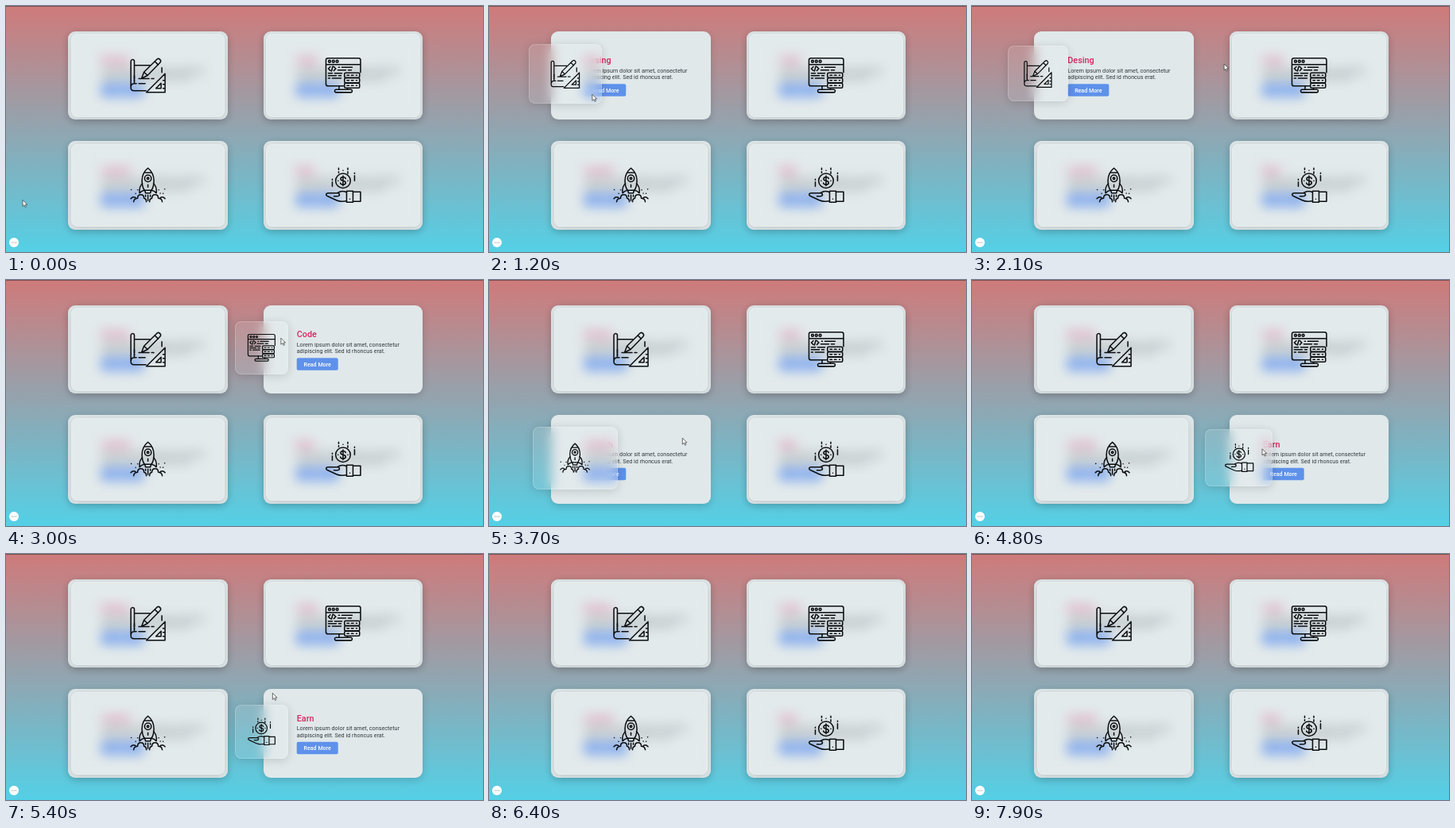
Write an HTML page that moves like this. It is 600x310 px and loops after 8000 ms.

```html
<!DOCTYPE html>
<html lang="en">
<head>
<meta charset="utf-8">
<title>Glass cards</title>
<style>
  html, body { margin: 0; width: 100%; height: 100%; overflow: hidden; }
  #stage { position: relative; width: 600px; height: 310px; overflow: hidden;
    background: linear-gradient(#cf7a7a, #54d0e6); }
  svg { position: absolute; left: 0; top: 0; width: 600px; height: 310px; }
  text { font-family: Roboto, sans-serif; }
  .card { position: absolute; width: 200.5px; height: 111.5px; border-radius: 9px;
    background: #e0e8ea; box-shadow: 0 3px 10px rgba(0, 0, 0, .16); }
  .panel { position: absolute; box-sizing: border-box; border-radius: 8px;
    background: rgba(255, 255, 255, .09); border: .6px solid rgba(255, 255, 255, .2);
    box-shadow: 0 2px 12px rgba(0, 0, 0, .15);
    -webkit-backdrop-filter: blur(7.5px); backdrop-filter: blur(7.5px); }
  .icon { fill: none; stroke: #0c0f10; stroke-width: 1.55; stroke-linecap: round; stroke-linejoin: round; }
</style>
</head>
<body>
<div id="stage"></div>
<script>
const LOOP = 8000, FADE = 500;
const stage = document.getElementById('stage');

// Icons are drawn in a 45 x 45 box
const icons = {
  design: `
    <path d="M1 38V5a2.2 2.2 0 0 1 4.4 0V33M5.4 10H25M40 13V19M1 38q0-5 4.4-5H8M11 33H19M1 38q0 4 4 4H20"/>
    <path d="M14.5 26.5L17.5 18.5L34 2.2q1.8-1.4 3.6.4t.4 3.7L22 22.8ZM17.5 18.5L22 22.8M31 5L35.4 9.4M11 26.7H24M27 26.7H30"/>
    <path d="M44 20.5V44H20.5ZM39 32.5V39H32.5ZM41.5 29H44M41.5 34H44M41.5 39H44"/>
    <path d="M5.4 23V27M5.4 29V30"/>`,
  code: `
    <path d="M23 36H3.5q-2.5 0-2.5-2.5V3.5Q1 1 3.5 1H42q2.5 0 2.5 2.5V19M1 9H44.5"/>
    <circle cx="5.5" cy="5" r="1.4"/><circle cx="10.3" cy="5" r="1.4"/><circle cx="15.1" cy="5" r="1.4"/>
    <path d="M6.5 11.8L4 14.2L6.5 16.6M9.6 11.2L8 17.2M11 11.8L13.4 14.2L11 16.6"/>
    <path d="M17 12.5H18M21 12.5H34M16 16H26M29 16H33M4 20H9M12 20H21M4 23H14M17 23H20M4 26.2H6M9 26.2H20"/>
    <path d="M17.5 36V40.5M28 40.5V39M13.5 40.5H32.5q1.5 0 1.5 1.8t-1.5 1.8H13.5q-1.5 0-1.5-1.8t1.5-1.8Z"/>
    ${[19.5, 26, 32.5].map(y => `<rect x="24.3" y="${y}" width="19" height="6" rx="1.4"/>
      <path d="M27.5 ${y + 3}H30M33 ${y + 3}H35.5M39 ${y + 3}H40"/>`).join('')}`,
  rocket: `
    <path d="M22.5 1Q15 7 15 17Q15 24 18 29H27Q30 24 30 17Q30 7 22.5 1ZM18.3 6.8H26.7"/>
    <circle cx="22.5" cy="14" r="4.2"/><circle cx="22.5" cy="14" r="1.2"/>
    <path d="M15.6 20.5Q11 24 12 32.5Q14.5 29.5 18 29M29.4 20.5Q34 24 33 32.5Q30.5 29.5 27 29M18.5 29L19.5 32.5H25.5L26.5 29M22.5 22V25"/>
    <path d="M19.5 35V37M22.5 35V42M25.5 35V37"/>
    <path d="M1 39.5q3.500-4 7 0M4.500 43.500q.5-4.500 5-4.500q0-4.500 4-4.500t4 4.500q3 .5 3 4.500"/>
    <path d="M44 39.5q-3.500-4-7 0M40.500 43.500q-.5-4.500-5-4.500q0-4.500-4-4.500t-4 4.500q-3 .5-3 4.500"/>
    <path d="M1.500 28.200h.1M7 33h.1M9.500 28.500h.1M43.500 27.500h.1M38 32.800h.1M36 28.500h.1M41.500 33h.1"/>`,
  earn: `
    <circle cx="22.500" cy="17" r="9.300"/>
    <path d="M25.800 14.300q-.6-2-3.300-2t-3 2.200q0 2 3.100 2.500t3.200 2.500q0 2.300-3.200 2.300t-3.400-2.100M22.500 10.800V23.200M28.500 17h.1M16.300 17h.1"/>
    <path d="M17 1V3M17 5.500V7M22.500 4h.1M28.500 1V3M28.500 5.500V8M9 15V16M9 18.500V24M37 7V8M37 10.500V17"/>
    <path d="M27 31.500Q23 29.500 19.500 30.500L15 32.500H4q-2.700 0-2.700 2q0 1.500 2 2L14 41.500q4 1.800 8 1.500L27 42.500M15 32.500q3 0 3 2t-3 2H11"/>
    <path d="M27 30H35V44H27ZM35 31H44.500M35 43H44.500V31M31 40h.1"/>`
};

// Each card: title, icon, position, and the time the pointer enters and leaves
const cards = [
  { title: 'Desing', icon: 'design', x: 78.3, y: 31.5, enter: 950, leave: 2060 },
  { title: 'Code', icon: 'code', x: 323.7, y: 31.5, enter: 2120, leave: 3160 },
  { title: 'Launch', icon: 'rocket', x: 78.3, y: 170, enter: 3500, leave: 4390 },
  { title: 'Earn', icon: 'earn', x: 323.7, y: 170, enter: 4520, leave: 5430 }
];

// Pointer path: time, x, y
const path = [
  [0, 21, 244.500], [500, 34, 215], [950, 79, 140], [1300, 150, 100], [1800, 230, 85],
  [2060, 282, 76], [2100, 317, 73], [2350, 348, 72], [3000, 346, 73], [3160, 321, 105],
  [3350, 296, 160], [3500, 277, 186], [3900, 210, 212], [4300, 268, 209], [4400, 280, 208],
  [4520, 325, 206], [4850, 372, 214], [5400, 335.5, 175.5], [5440, 330, 167],
  [5750, 305, 85], [6100, 302, -20]
];

const textOf = c => `
  <g transform="translate(${c.x + 42} ${c.y})">
    <text y="40.800" font-size="10.800" font-weight="500" fill="#d9255f">${c.title}</text>
    <g font-size="7.200" fill="#34393d">
      <text y="52">Lorem ipsum dolor sit amet, consectetur</text>
      <text y="60.600">adipiscing elit. Sed id rhoncus erat.</text>
    </g>
    <rect y="66.700" width="52" height="15.600" rx="2" fill="#5e91ea"/>
    <text x="26" y="77.100" font-size="7.100" font-weight="500" fill="#fff" text-anchor="middle">Read More</text>
  </g>`;

stage.innerHTML = `
  ${cards.map(c => `<div class="card" style="left:${c.x}px;top:${c.y}px"></div>`).join('')}
  <svg viewBox="0 0 600 310">
    <rect width="600" height="1" fill="#7d5153"/>
    ${cards.map(textOf).join('')}
  </svg>
  ${cards.map(() => '<div class="panel"></div>').join('')}
  <svg viewBox="0 0 600 310">
    ${cards.map(c => `<g class="icon">${icons[c.icon]}</g>`).join('')}
    <circle cx="10" cy="298" r="6" fill="#fff"/>
    <path d="M7.700 298h.1M10 298h.1M12.300 298h.1" stroke="#777" stroke-width="1.200" stroke-linecap="round"/>
    <path id="pointer" d="M0 0V8L1.900 6.300L3.200 9.200L4.500 8.600L3.200 5.800H5.700Z" fill="#fff" stroke="#333" stroke-width=".7"/>
  </svg>`;

const panels = stage.querySelectorAll('.panel');
const glyphs = stage.querySelectorAll('.icon');
const pointer = document.getElementById('pointer');

const lerp = (a, b, k) => a + (b - a) * k;
const clamp = v => Math.max(0, Math.min(1, v));

// cubic-bezier(.25, .1, .25, 1)
function ease(x) {
  const curve = (a, b, s) => 3 * a * s * (1 - s) ** 2 + 3 * b * s * s * (1 - s) + s ** 3;
  let lo = 0, hi = 1;
  for (let i = 0; i < 24; i++) {
    const mid = (lo + hi) / 2;
    if (curve(.25, .25, mid) < x) lo = mid; else hi = mid;
  }
  return curve(.1, 1, lo);
}

function pointerAt(t) {
  const i = path.findIndex(p => p[0] > t);
  if (i < 0) return path[path.length - 1].slice(1);
  const [a, b] = [path[i - 1], path[i]];
  const k = (t - a[0]) / (b[0] - a[0]);
  return [lerp(a[1], b[1], k), lerp(a[2], b[2], k)];
}

function draw(t) {
  cards.forEach((c, i) => {
    const progress = at => ease(clamp((t - at) / FADE));
    const open = progress(c.enter) - progress(c.leave);
    const x = c.x + lerp(3.5, -36, open), y = c.y + lerp(3.5, 20, open);
    const w = lerp(193.5, 67, open), h = lerp(104.5, 67.5, open);
    Object.assign(panels[i].style, { left: x + 'px', top: y + 'px', width: w + 'px', height: h + 'px' });
    const scale = lerp(1, .78, open);
    glyphs[i].setAttribute('transform',
      `translate(${x + w / 2} ${y + h / 2}) scale(${scale}) translate(-22.5 -22.5)`);
  });
  pointer.setAttribute('transform', `translate(${pointerAt(t)})`);
}

function tick() {
  draw(performance.now() % LOOP);
  requestAnimationFrame(tick);
}
tick();
</script>
</body>
</html>
```
